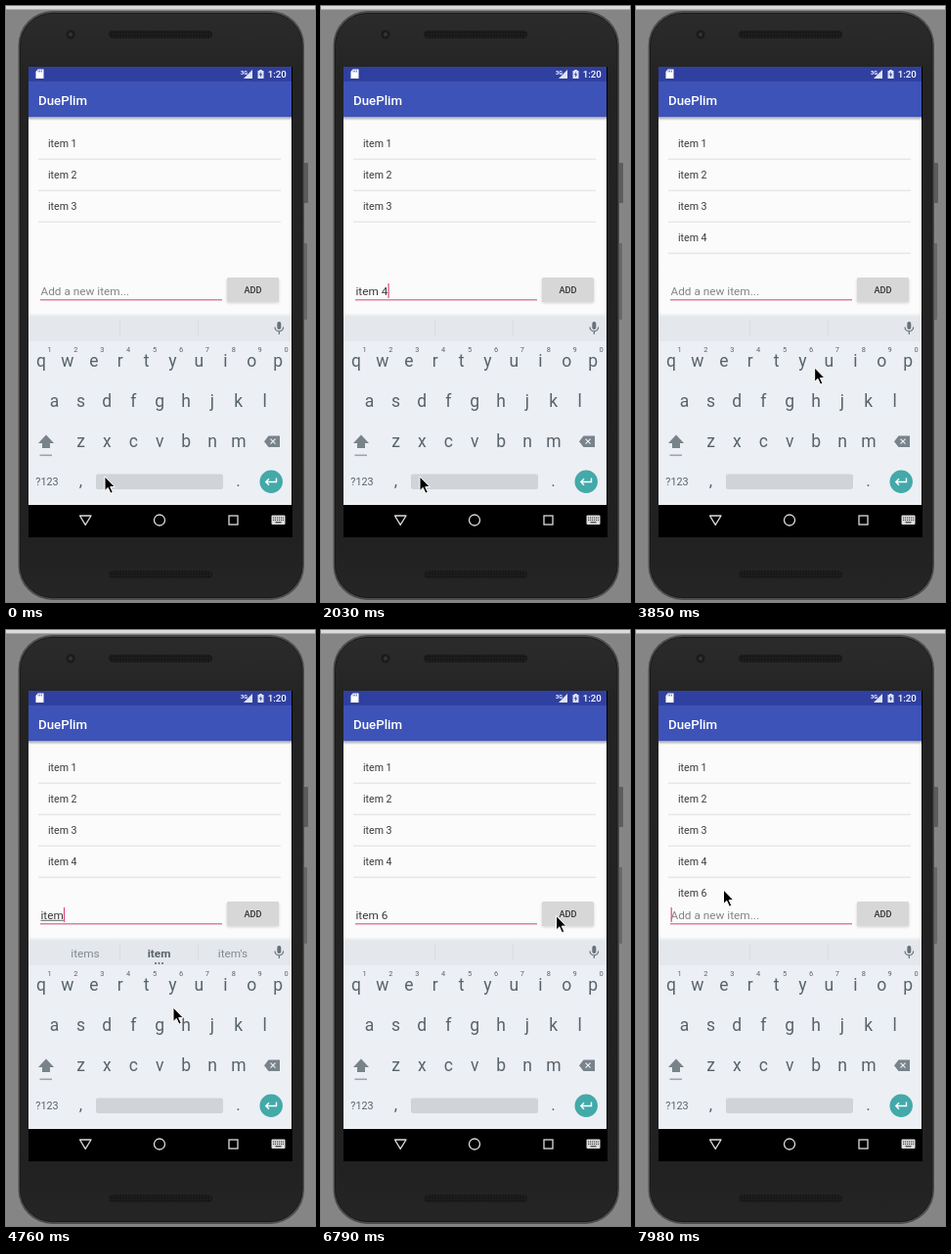
Recreate the animation shown at these times as an HTML page. Size 316 px wide and 608 px high, loop 8000 ms.

```html
<!DOCTYPE html>
<html lang="en">
<head>
<meta charset="utf-8">
<title>To-do list</title>
<style>
  html, body { margin: 0; width: 100%; height: 100%; overflow: hidden; background: #858585; }
  svg { display: block; width: 100vw; height: 100vh; }
  text { font-family: Roboto, sans-serif; white-space: pre; }
  .mid { text-anchor: middle; }
</style>
</head>
<body>
<svg viewBox="0 0 316 608" xmlns="http://www.w3.org/2000/svg">
  <defs>
    <linearGradient id="shade" x2="0" y2="1">
      <stop stop-color="#000" stop-opacity=".36"/>
      <stop offset="1" stop-color="#000" stop-opacity="0"/>
    </linearGradient>
    <linearGradient id="edge" x2="0" y2="1">
      <stop stop-color="#fbfbfb"/>
      <stop offset="1" stop-color="#e4e7eb"/>
    </linearGradient>
    <linearGradient id="body" x2="0" y2="1">
      <stop stop-color="#2b2b2b"/>
      <stop offset=".12" stop-color="#232323"/>
      <stop offset=".9" stop-color="#212121"/>
      <stop offset="1" stop-color="#252525"/>
    </linearGradient>
    <pattern id="mesh" width="3" height="3" patternUnits="userSpaceOnUse">
      <rect width="3" height="3" fill="#181818"/>
      <circle cx="1.5" cy="1.5" r=".7" fill="#242424"/>
    </pattern>
    <filter id="soft" x="-20%" y="-40%" width="140%" height="180%"><feGaussianBlur stdDeviation="1.3"/></filter>
    <clipPath id="listClip"><rect x="23" y="113" width="269" height="163"/></clipPath>
    <clipPath id="btnClip"><rect x="226" y="277" width="53" height="25" rx="1.5"/></clipPath>
  </defs>

  <!-- device -->
  <rect width="316" height="608" fill="#858585"/>
  <rect width="316" height="3.5" fill="#d9dcda"/>
  <rect x="304" y="160" width="5" height="41" rx="1" fill="#5c5c5c"/>
  <rect x="304" y="242" width="4" height="78" rx="1" fill="#686868"/>
  <rect x="12.5" y="5" width="292.5" height="601" rx="35" fill="#4c4c4c"/>
  <rect x="14.5" y="7.5" width="288.5" height="596" rx="33" fill="url(#body)" stroke="#1a1a1a"/>
  <circle cx="66" cy="29" r="4.5" fill="#1b1b1b"/>
  <circle cx="66" cy="29" r="2" fill="#30363a"/>
  <rect x="105" y="25" width="106" height="8" rx="4" fill="url(#mesh)"/>
  <rect x="105" y="576" width="106" height="8" rx="4" fill="url(#mesh)"/>

  <!-- app -->
  <rect x="23" y="62" width="270" height="480" fill="#000"/>
  <rect x="23" y="62" width="269" height="253" fill="#fbfbfb"/>
  <rect x="23" y="113" width="269" height="4" fill="url(#shade)"/>
  <rect x="23" y="77" width="269" height="36" fill="#3d53b8"/>
  <rect x="23" y="62" width="269" height="15" fill="#3040a0"/>
  <path d="M32.5 64.5H38.5V74H30.5V67Z" fill="#fff"/>
  <path d="M33 65.5v2M34.7 65.5v2M36.4 65.5v2" stroke="#3040a0" stroke-width=".7"/>
  <text x="240" y="69.5" font-size="5.5" font-weight="700" fill="#fff">3G</text>
  <path d="M252 65V74H243Z" fill="#dfe3f3"/>
  <path d="M257.5 66H259.2V65H261.8V66H263.5V74H257.5Z" fill="#dfe3f3"/>
  <path d="M261 67l-2.2 3.2h1.5l-.4 2.6 2.3-3.4h-1.6Z" fill="#3040a0"/>
  <text x="267.7" y="73" font-size="9.7" font-weight="500" fill="#fff">1:20</text>
  <text x="33" y="101" font-size="13.3" font-weight="500" fill="#fff">DuePlim</text>
  <g id="list" clip-path="url(#listClip)"></g>

  <!-- entry row -->
  <path d="M35 299.8H221" stroke="#e27f9b" stroke-width="1.5"/>
  <text id="entry" x="35.5" y="294.5" font-size="11.8"></text>
  <path id="under" stroke="#555" stroke-width=".9"/>
  <path id="caret" stroke="#e8467c" stroke-width="1.2"/>
  <rect id="lift" x="225.5" y="278" width="54" height="25.5" rx="2" fill="#000" filter="url(#soft)"/>
  <rect x="226" y="277" width="53" height="25" rx="1.5" fill="#d7d7d7"/>
  <g clip-path="url(#btnClip)"><circle id="ripple" fill="#000"/></g>
  <text class="mid" x="252.5" y="293" font-size="9.2" font-weight="500" fill="#333">ADD</text>

  <!-- keyboard -->
  <rect x="23" y="315" width="269" height="194" fill="#eceff4"/>
  <rect x="23" y="315" width="269" height="27" fill="#e4e7eb"/>
  <rect x="23" y="313" width="269" height="4" fill="url(#edge)"/>
  <path d="M116.5 321V336M196.5 321V336" stroke="#d8dbdf"/>
  <g id="hints" class="mid" font-size="11.8" fill="#7f8a91"></g>
  <g id="dots" fill="#5a666d"><circle cx="153" cy="340" r="1"/><circle cx="156.5" cy="340" r="1"/><circle cx="160" cy="340" r="1"/></g>
  <rect x="277.3" y="322" width="4" height="8" rx="2" fill="#66727a"/>
  <path d="M275 327.5a4.3 4.3 0 0 0 8.6 0M279.3 332V335" fill="none" stroke="#66727a" stroke-width="1.2"/>
  <g id="keys" class="mid" fill="#57636b"></g>
  <path d="M41 437.5L49 446H45V451H37V446H33Z" fill="#78838a"/>
  <path d="M34.5 458.3H47" stroke="#9ca4a9" stroke-width="1.6"/>
  <path d="M268.5 438.5H280V450H268.5L264 444.2Z" fill="#78838a"/>
  <path d="M270.5 441.7l5 5m0-5l-5 5" stroke="#eceff4" stroke-width="1.2"/>
  <rect x="92" y="477.5" width="130" height="15.5" rx="2" fill="#d0d4d9"/>
  <circle cx="271.2" cy="485.3" r="11.7" fill="#43a9a9"/>
  <path d="M276.5 481.5V485.5H266M269 482.3L265.8 485.5L269 488.7" fill="none" stroke="#fff" stroke-width="1.4"/>

  <!-- navigation bar -->
  <g fill="none" stroke="#dcdcdc" stroke-width="1.3">
    <path d="M75.5 520H87L81.2 529.3Z" stroke-linejoin="round"/>
    <circle cx="157" cy="524.5" r="5.5"/>
    <rect x="228" y="520" width="9" height="9"/>
  </g>
  <rect x="271.5" y="519.5" width="14" height="9.5" rx="1" fill="#dcdcdc"/>
  <path d="M273 522H284M273 524.3H284" stroke="#222" stroke-width="1" stroke-dasharray="1.2 .8"/>
  <path d="M275.5 526.8H281.5" stroke="#222" stroke-width="1"/>

  <path id="pointer" d="M0 0V14.5L3.3 11.4L5.9 17.2L8.3 16.1L5.7 10.6H10.3Z" fill="#000" stroke="#fff" stroke-width="1" stroke-linejoin="round"/>
</svg>
<script>
const LOOP = 8000, STEP = 70;
const $ = id => document.getElementById(id);

function add(parent, tag, attrs, label) {
  const el = document.createElementNS("http://www.w3.org/2000/svg", tag);
  set(el, attrs);
  if (label) el.textContent = label;
  parent.appendChild(el);
  return el;
}
function set(el, attrs) {
  for (const k in attrs) el.setAttribute(k, attrs[k]);
}

// keyboard letters
[["qwertyuiop", 36], ["asdfghjkl", 49.5], ["zxcvbnm", 76.5]].forEach(([row, x0], r) => {
  [...row].forEach((ch, i) => {
    const x = x0 + i * 26.9;
    add($("keys"), "text", { x, y: 368 + r * 41, "font-size": 17.5 }, ch);
    if (r === 0) add($("keys"), "text", { x: x + 8.5, y: 353, "font-size": 7.4 }, String((i + 1) % 10));
  });
});
add($("keys"), "text", { x: 42, y: 489, "font-size": 10.8 }, "?123");
add($("keys"), "text", { x: 76.5, y: 490, "font-size": 17 }, ",");
add($("keys"), "text", { x: 237.5, y: 490, "font-size": 17 }, ".");

// list rows: [number, time added]
const rows = [[1, 0], [2, 0], [3, 0], [4, 3150], [6, 6970]].map(([n, at], i) => {
  const g = add($("list"), "g", {});
  const y = 144 + i * 32;
  add(g, "text", { x: 43, y, "font-size": 10.6, fill: "#3a3a3a" }, "item " + n);
  add(g, "path", { d: `M33 ${y + 12.2}H281`, stroke: "#dedede" });
  return { g, at };
});

const hints = [81, 156.5, 232].map((x, i) =>
  add($("hints"), "text", { x, y: 333.5, ...(i === 1 && { "font-weight": 700, fill: "#56636b" }) }));

// entry field: [time, content]
const edits = [
  [-1200, ""], [490, "i"], [630, "it"], [770, "ite"], [910, "item"], [1260, "item "], [2020, "item 4"],
  [3150, ""], [4270, "i"], [4410, "it"], [4550, "ite"], [4690, "item"], [5200, "item "], [6160, "item 6"],
  [6970, ""]
];
const words = {
  i: ["in", "I", "is"],
  it: ["it's", "it", "its"],
  ite: ["items", "item", "ite"],
  item: ["items", "item", "item's"]
};

// pointer: [start, end, x, y]
const moves = [
  [0, 0, 101, 480], [2310, 2800, 245.5, 282], [3430, 3990, 171, 385],
  [6300, 6790, 240.5, 291.5], [7280, 7770, 89.5, 265]
];
const presses = [[2900, 3130], [6860, 6960]];

const clamp = v => Math.max(0, Math.min(1, v));
const ease = v => v * v * (3 - 2 * v);

function pointerAt(t) {
  let [, , x, y] = moves[0];
  for (const [a, b, mx, my] of moves.slice(1)) {
    const k = ease(clamp((t - a) / (b - a)));
    x += (mx - x) * k;
    y += (my - y) * k;
  }
  return [x, y];
}

function drawEntry(t) {
  const [since, value] = edits.filter(e => e[0] <= t).pop();
  const entry = $("entry"), sugg = words[value];
  entry.textContent = value || "Add a new item...";
  set(entry, { fill: value ? "#3a3a3a" : "#858585" });
  const end = 35.5 + (value ? entry.getComputedTextLength() : 0);
  const caretOn = (t - since) % 1000 < 500 && t >= STEP;
  set($("caret"), { d: `M${end + .7} 283V298`, opacity: caretOn ? 1 : 0 });
  set($("under"), { d: `M35.5 296.3H${end}`, opacity: sugg ? 1 : 0 });
  set($("dots"), { opacity: sugg ? 1 : 0 });
  hints.forEach((h, i) => h.textContent = sugg ? sugg[i] : "");
}

function drawButton(t, x, y) {
  let lift = 0, glow = 0, r = 0;
  for (const [down, up] of presses) {
    if (t < down || t > up + 450) continue;
    const fade = 1 - clamp((t - up) / 450);
    lift = clamp((t - down) / 100) * fade;
    glow = .035 * fade;
    r = 8 + 50 * clamp((t - down) / 400);
  }
  set($("lift"), { opacity: .12 + .22 * lift });
  set($("ripple"), { cx: x, cy: y, r, opacity: glow });
}

function draw(ms) {
  const t = Math.floor((ms % LOOP) / STEP) * STEP;
  const [x, y] = pointerAt(t);
  rows.forEach(({ g, at }) => set(g, { opacity: t >= at ? 1 : 0 }));
  drawEntry(t);
  drawButton(t, x, y);
  set($("pointer"), { transform: `translate(${x} ${y})` });
}

const start = performance.now();
function tick() {
  draw(performance.now() - start);
  requestAnimationFrame(tick);
}
tick();
</script>
</body>
</html>
```
